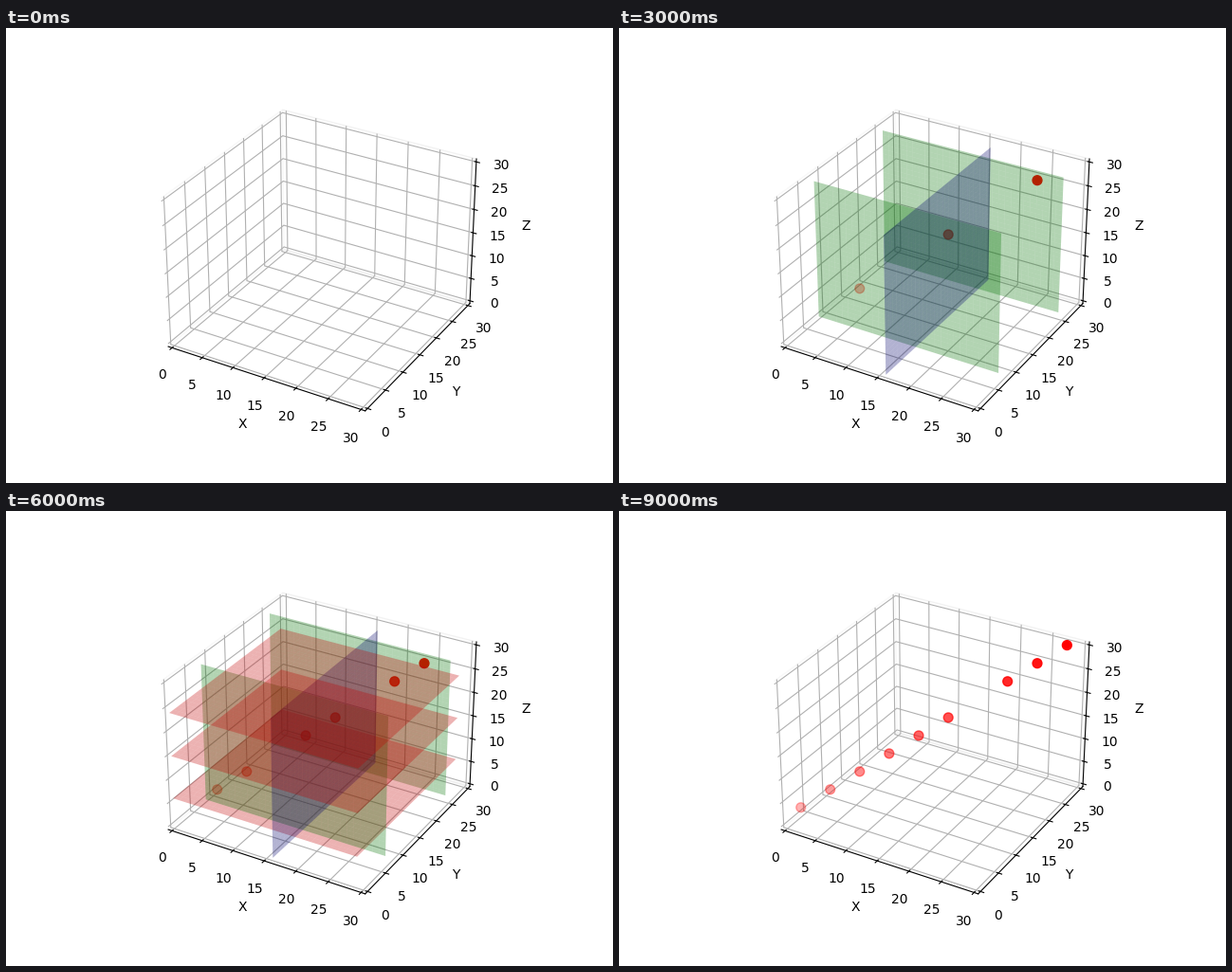
A matplotlib script that plays this animation: 640x480 px, repeating every 10000 ms.

```python
import numpy as np
import matplotlib.pyplot as plt
from matplotlib.animation import FuncAnimation

# Level order of a k-d tree over the points (v, v + 1, v + 2)
ORDER = [16, 7, 25, 4, 13, 22, 28, 1, 10]
SPLIT_AXIS = [0, 1, 1, 2, 2, 2, 2, 0]
COLORS = ["b", "g", "r"]
STEPS = 10
ALPHA = 0.3

fig = plt.figure(figsize=(6.4, 4.8), dpi=100)
ax = fig.add_subplot(projection="3d")


def split_plane(axis, value):
    """Draw the plane where the given coordinate equals value."""
    side = np.arange(30)
    a, b = np.meshgrid(side, side)
    coords = [a, b]
    coords.insert(axis, np.full_like(a, value))
    return ax.plot_surface(*coords, color=COLORS[axis], alpha=ALPHA, linewidth=0)


def point_cloud(count):
    v = np.array(ORDER[:count])
    return ax.scatter(v, v + 1, v + 2, c="r", marker="o", s=50)


planes = [split_plane(axis, v + axis) for axis, v in zip(SPLIT_AXIS, ORDER)]
clouds = [point_cloud(n) for n in range(1, STEPS)]

margin = 30 / 48
limits = (-margin, 30 + margin)
ax.set(xlim=limits, ylim=limits, zlim=limits, xlabel="X", ylabel="Y", zlabel="Z")
for axis in (ax.xaxis, ax.yaxis, ax.zaxis):
    axis.pane.fill = False


def update(step):
    done = step == STEPS - 1
    for i, plane in enumerate(planes):
        plane.set_visible(i < step and not done)
    for i, cloud in enumerate(clouds):
        cloud.set_visible(i == step - 1)
    return planes + clouds


anim = FuncAnimation(fig, update, frames=STEPS, interval=1000, repeat=True,
                     repeat_delay=0, init_func=lambda: update(0))
plt.show()
```
